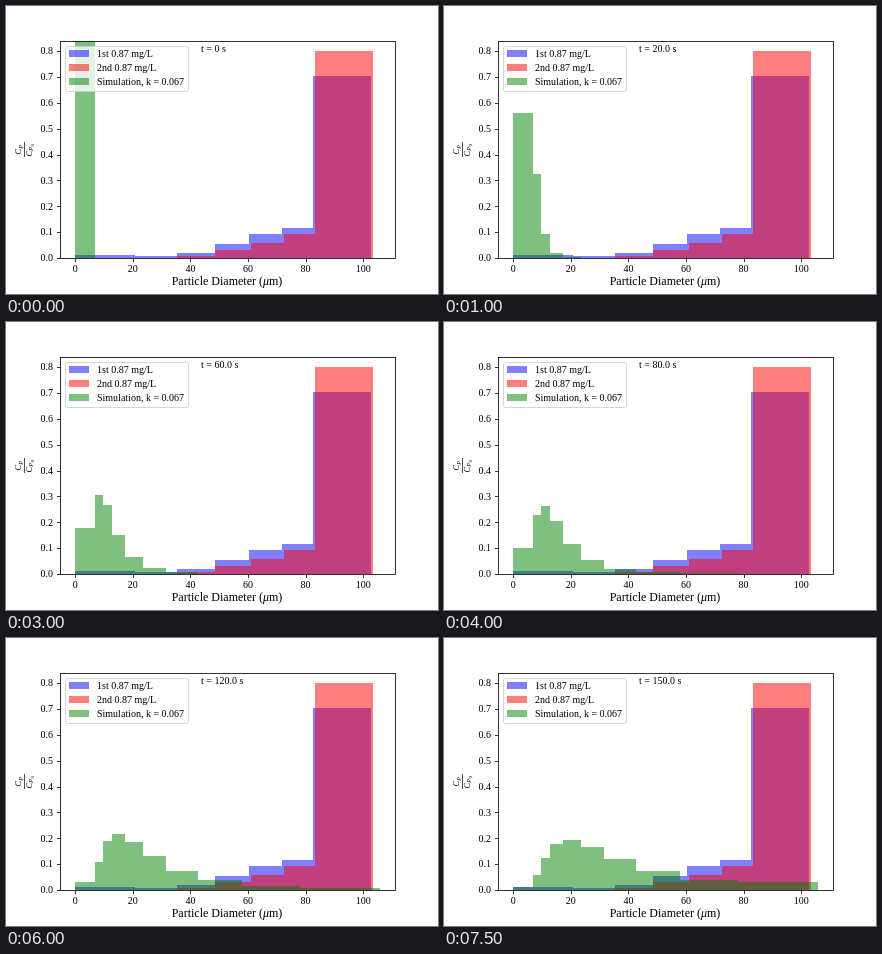
Recreate the animation shown at these times as an HTML page with a canvas. Size 432 by 288 pixels, loop 8000 ms.

```html
<!DOCTYPE html>
<html lang="en">
<head>
<meta charset="utf-8">
<title>Particle diameter histogram</title>
<style>
  html, body { margin: 0; width: 100%; height: 100%; overflow: hidden; background: #fff; }
  canvas { display: block; }
</style>
</head>
<body>
<canvas id="chart" width="432" height="288"></canvas>
<script>
const ctx = document.getElementById('chart').getContext('2d');
const SERIF = '"Liberation Serif", "Times New Roman", serif';
const LEFT = 54, RIGHT = 389, TOP = 35, BASE = 252;
const UNIT = 258.4;            // pixels per 1.0 on the y axis
const STEP = 500, STEPS = 16;  // each step adds 10 s of simulated time
const RATE = 0.0288;

const BLUE = 'rgba(0,0,255,.5)', RED = 'rgba(255,0,0,.5)', GREEN = 'rgba(0,128,0,.5)';
const first = { edges: [69, 129, 171, 209, 243, 276, 307, 365], tops: [249, 250, 247, 238, 228, 222, 70] };
const second = { edges: [171, 209, 245, 278, 309, 367], tops: [250, 244, 237, 228, 45] };
const simEdges = [69, 89, 97, 106, 119, 137, 160, 192, 236, 294, 374];

function text(str, x, y, size = 10, align = 'left', style = '') {
  ctx.font = `${style} ${size}px ${SERIF}`;
  ctx.textAlign = align;
  ctx.fillStyle = '#000';
  ctx.fillText(str, x, y);
}

function line(x1, y1, x2, y2) {
  ctx.beginPath();
  ctx.moveTo(x1, y1);
  ctx.lineTo(x2, y2);
  ctx.stroke();
}

function bars({ edges, tops }, color) {
  ctx.fillStyle = color;
  tops.forEach((top, i) => ctx.fillRect(edges[i], top, edges[i + 1] - edges[i], BASE - top));
}

// Each bin feeds the next at a constant rate (Poisson); the last bin collects the rest.
function simulation(seconds) {
  const a = RATE * seconds, last = simEdges.length - 2;
  let p = Math.exp(-a), rest = 1;
  const tops = [];
  for (let i = 0; i <= last; i++) {
    const share = i === last ? rest : p;
    tops.push(Math.max(TOP, Math.round(BASE - UNIT * share)));
    rest -= p;
    p *= a / (i + 1);
  }
  return { edges: simEdges, tops };
}

function axes() {
  ctx.strokeStyle = '#000';
  ctx.lineWidth = 0.8;
  ctx.strokeRect(LEFT + .5, TOP + .5, RIGHT - LEFT, BASE - TOP);
  for (let v = 0; v <= 100; v += 20) {
    const x = 69.2 + v * 2.88, px = Math.round(x) + .5;
    line(px, BASE + .5, px, BASE + 4);
    text(v, x, 266, 10, 'center');
  }
  for (let i = 0; i <= 8; i++) {
    const y = BASE - UNIT * i / 10, py = Math.round(y) + .5;
    line(LEFT - 3, py, LEFT + .5, py);
    text((i / 10).toFixed(1), 47, Math.round(y + 3.2), 10, 'right');
  }
  text('Particle Diameter (', 165.7, 279, 12);
  let x = 165.7 + ctx.measureText('Particle Diameter (').width;
  text('μ', x, 279, 12, 'left', 'italic');
  x += ctx.measureText('μ').width;
  text('m)', x, 279, 12);
}

function yLabel() {
  ctx.save();
  ctx.translate(18.5, 143.5);
  ctx.rotate(-Math.PI / 2);
  ctx.lineWidth = 0.7;
  line(-7.5, 0, 7.5, 0);
  text('C', -5, -3.2, 8.4, 'left', 'italic');
  text('P', .8, -1.8, 5.9, 'left', 'italic');
  text('C', -7, 7.6, 8.4, 'left', 'italic');
  text('P', -1.2, 8.9, 5.9, 'left', 'italic');
  text('0', 3, 9.9, 5);
  ctx.restore();
}

function legend() {
  ctx.beginPath();
  ctx.roundRect(59.5, 40.5, 123, 45, 2);
  ctx.fillStyle = 'rgba(255,255,255,.8)';
  ctx.fill();
  ctx.strokeStyle = 'rgba(204,204,204,.8)';
  ctx.lineWidth = 1;
  ctx.stroke();
  [[BLUE, '1st 0.87 mg/L'], [RED, '2nd 0.87 mg/L'], [GREEN, 'Simulation, k = 0.067']]
    .forEach(([color, label], i) => {
      ctx.fillStyle = color;
      ctx.fillRect(63, 44 + 14 * i, 20, 7);
      text(label, 91, 51 + 14 * i);
    });
}

function draw() {
  const seconds = Math.floor(performance.now() / STEP) % STEPS * 10;
  ctx.fillStyle = '#fff';
  ctx.fillRect(0, 0, 432, 288);
  bars(first, BLUE);
  bars(second, RED);
  bars(simulation(seconds), GREEN);
  axes();
  yLabel();
  text(`t = ${seconds ? seconds.toFixed(1) : 0} s`, 195, 46);
  legend();
  requestAnimationFrame(draw);
}
draw();
</script>
</body>
</html>
```
